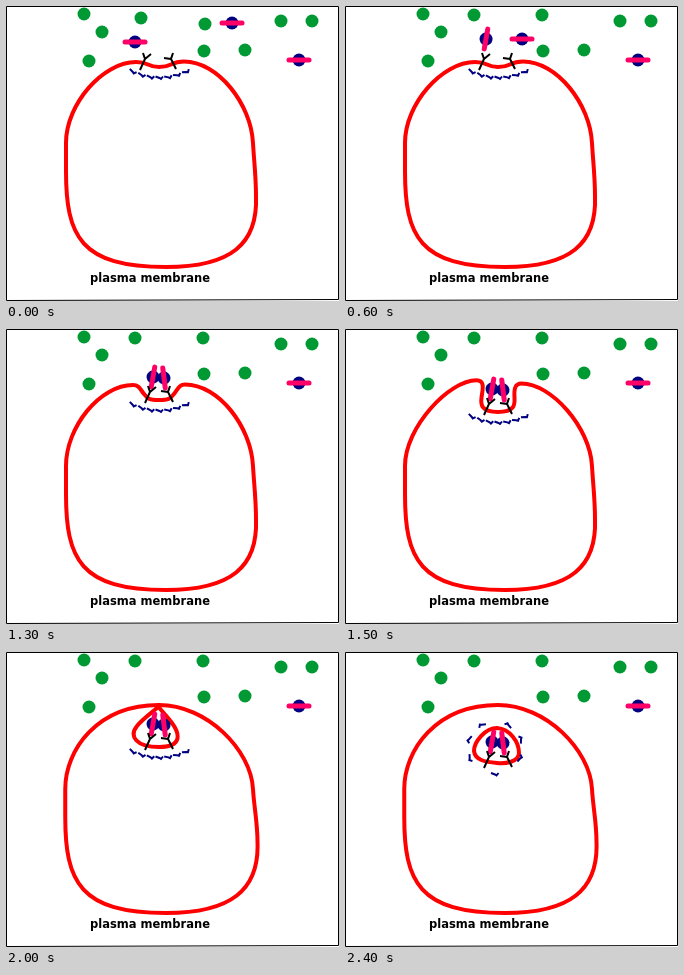
These frames come from a looping animation (333 by 295 pixels, 2500 ms). An HTML page:

```html
<!DOCTYPE html>
<html lang="en">
<head>
<meta charset="utf-8">
<title>Endocytosis</title>
<style>
  html, body { margin: 0; width: 100%; height: 100%; overflow: hidden; background: #fff; }
  svg { display: block; width: 100vw; height: 100vh; }
  .dot { fill: #093; }
  .membrane { fill: none; stroke: #f00; stroke-width: 4; stroke-linejoin: round; }
  .ligand circle { fill: #000080; }
  .ligand path { stroke: #f06; stroke-width: 5; stroke-linecap: round; }
  .receptor { fill: none; stroke: #000; stroke-width: 2; }
  .coat { fill: none; stroke: #000080; stroke-width: 2; }
  text { font: bold 11.5px "DejaVu Sans", Verdana, sans-serif; }
</style>
</head>
<body>
<svg id="stage" viewBox="0 0 333 295">
  <path d="M.5,.5H332.5V293.5L.5,294.5Z" fill="#fff" stroke="#000"/>
  <text x="84" y="276">plasma membrane</text>
</svg>
<script>
const STEP = 100, LOOP = 2500, DETACH = 21;
const stage = document.getElementById('stage');
const parts = [];

function add(tag, attrs, parent = stage) {
  const el = document.createElementNS('http://www.w3.org/2000/svg', tag);
  for (const name in attrs) el.setAttribute(name, attrs[name]);
  return parent.appendChild(el);
}

// Linear interpolation through rows of [tick, ...values].
function track(rows, tick) {
  let i = 0;
  while (i < rows.length - 2 && tick >= rows[i + 1][0]) i++;
  const [a, b] = [rows[i], rows[i + 1]];
  const k = Math.min(1, Math.max(0, (tick - a[0]) / (b[0] - a[0])));
  return a.slice(1).map((v, j) => v + (b[j + 1] - v) * k);
}
const ramp = (from, to, tick) => track([[from, 0], [to, 1]], tick)[0];

// How far the pit and everything bound to it has sunk.
const sink = tick => track([[10, 0], [13, 10], [17, 34], [22, 34], [24, 52]], tick)[0];

// Each wall of the pit: tick, lip x y, wall x y, wall slope x y, lip roundness, shoulder reach.
const leftWall = [
  [10, 130, 56, 142, 58.5, 4, 2, 5, 33],
  [13, 127, 56, 138, 65, 4, 5, 6, 33],
  [17, 136, 46.5, 135, 72, -6, 10, 12, 21],
  [20, 153, 53, 131, 74, -8, 10, 4, 62]
];
const rightWall = [
  [10, 178, 55.5, 165, 58.5, -4, 2, -5, -34],
  [13, 179, 55.5, 168, 65, -4, 5, -6, -34],
  [17, 174, 53.5, 171, 72, 5, 10, -8, -25],
  [20, 153, 53, 166, 71, 8, 11, -4, -48]
];

function cellPath(tick) {
  const [lx, ly, ax, ay, au, av, lr, ls] = track(leftWall, tick);
  const [rx, ry, bx, by, bu, bv, rr, rs] = track(rightWall, tick);
  const floor = 61 + sink(Math.min(tick, 20));
  const belly = (floor - 54) * .57;
  const swell = 1.5 * ramp(17, 20, tick);
  const left = 60 - swell / 2, right = 250 + swell;
  const pit = tick >= DETACH ? '' :
    `C${lx + lr},${ly} ${ax - au},${ay - av} ${ax},${ay}` +
    `C${ax + au},${ay + av} ${153 - belly},${floor} 153,${floor}` +
    `S${bx + bu},${by + bv} ${bx},${by}` +
    `S${rx + rr},${ry} ${rx},${ry}`;
  return `M${left},137C${left},98 ${lx - ls},${ly} ${lx},${ly}${pit}` +
    `C${rx - rs},${ry} 245,98 247,137` +
    `C248,155 ${right},170 ${right},190 ${right + 2},238 225,261 160,261` +
    `C74,261 ${left},230 ${left},165Z`;
}

function dot(cx, cy) {
  return add('circle', { class: 'dot', cx, cy, r: 6.5 });
}

// Bound parts follow the pit down and drift towards its middle.
function bind(el, keys, pull, twist = 0) {
  parts.push([el, tick => {
    const [x, y, turn] = track(keys, tick), k = ramp(10, 13, tick);
    return [x + pull * k, y + sink(tick), turn + twist * k];
  }]);
}

function ligand() {
  const g = add('g', { class: 'ligand' });
  add('circle', { r: 6.5 }, g);
  add('path', { d: 'M-10,0H10' }, g);
  return g;
}

function receptor(d, pull) {
  bind(add('path', { class: 'receptor', d }), [[0, 0, 0, 0], [1, 0, 0, 0]], pull);
}

// Coat pieces: an arc under the pit that ends as a ring around the vesicle.
function coatPiece(n) {
  const u = n / 3;
  const turn = -Math.sign(n) * (25 + 42 * Math.abs(n)), a = turn * Math.PI / 180;
  const ring = [150 - 27 * Math.sin(a), 96 + 26 * Math.cos(a), turn];
  const el = add('path', { class: 'coat', d: 'M-4,-1L0,.5L1.5,1.5L3.5,-1' });
  parts.push([el, tick => {
    const arc = [153.5 + 26.5 * u, 71.5 - 6 * u * u + sink(Math.min(tick, 20)), -25 * u];
    return track([[22, ...arc], [24, ...ring]], tick);
  }]);
}

[[78, 8], [96, 26], [83, 55], [198, 45], [239, 44], [275, 15], [306, 15]].forEach(p => dot(...p));
parts.push([dot(129, 9), tick => [6 * (1 - ramp(0, 3, tick)), 3 * (1 - ramp(0, 3, tick)), 0]]);
parts.push([dot(197, 9), tick => [2 * (1 - ramp(0, 3, tick)), 9 * (1 - ramp(0, 3, tick)), 0]]);

const cell = add('path', { class: 'membrane' });
const vesicle = add('path', {
  class: 'membrane',
  d: 'M152,76C165,77 174,90 174,101C174,110 160,112 152,111C140,110 130,108 129,99C129,90 140,76 152,76Z'
});
parts.push([vesicle, tick => [0, sink(tick) - 52, 0]]);

bind(ligand(), [[0, 129, 36, 0], [3, 134, 34, 38], [6, 141, 33, 100], [9, 142, 38, 100]], 5);
bind(ligand(), [[0, 226, 17, 0], [6, 177, 33, 0], [9, 165, 39, -80]], -7, -17);
ligand().setAttribute('transform', 'translate(293 54)');
receptor('M134,64L139,53L137,47M139,53L145,48', 5);
receptor('M170,63L165,53L167,47M165,53L158,52', -3);
for (let n = -3; n <= 3; n++) coatPiece(n);

function draw(tick) {
  for (const [el, place] of parts) {
    const [x, y, turn] = place(tick);
    el.setAttribute('transform', `translate(${x} ${y}) rotate(${turn})`);
  }
  cell.setAttribute('d', cellPath(tick));
  vesicle.setAttribute('visibility', tick >= DETACH ? 'visible' : 'hidden');
}

const start = performance.now();
function loop() {
  draw(Math.floor((performance.now() - start) % LOOP / STEP));
  requestAnimationFrame(loop);
}
loop();
</script>
</body>
</html>
```
